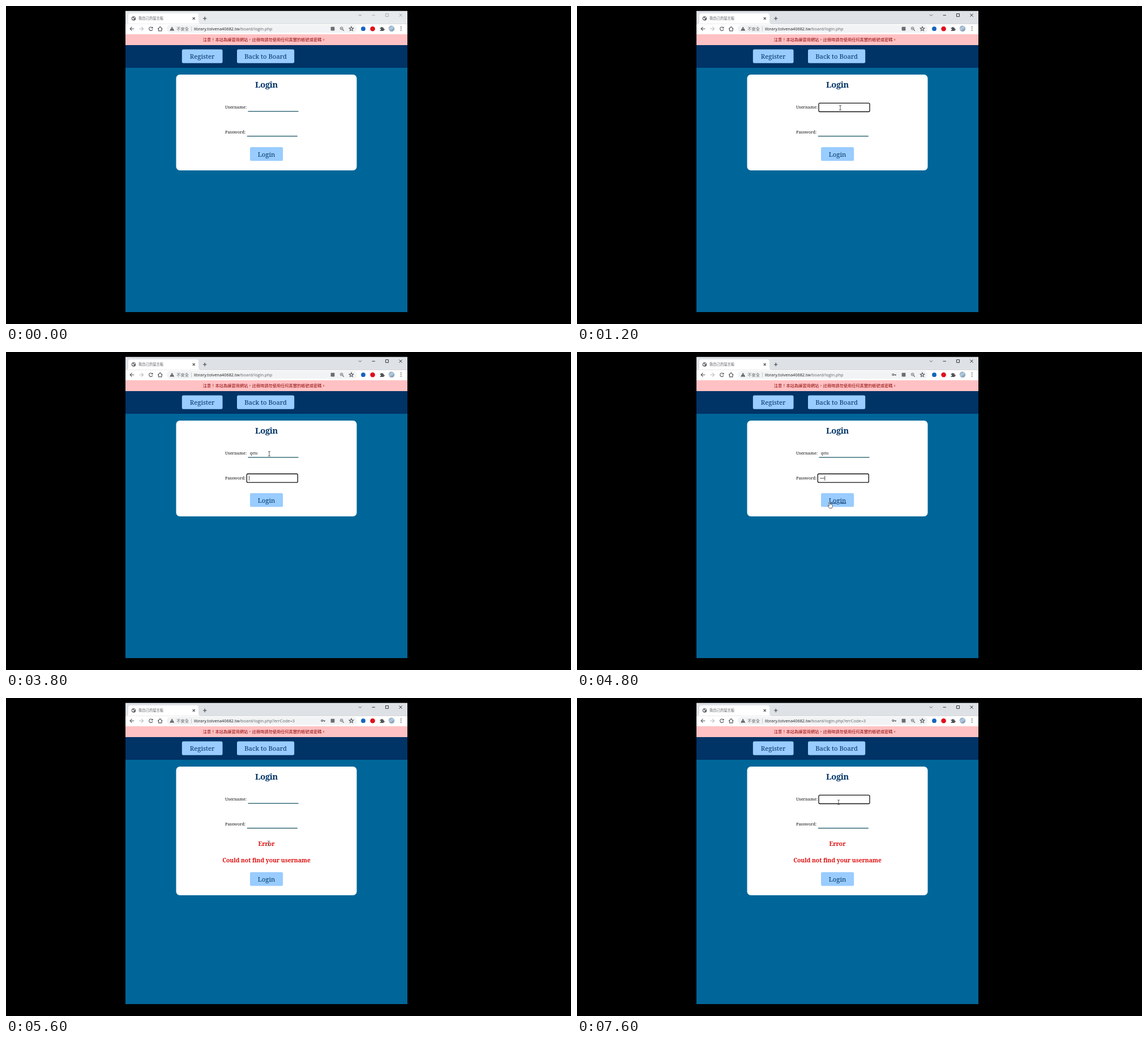
An HTML page for the animation above (8000 ms loop, 998x561 px).

```html
<!DOCTYPE html>
<html lang="zh-Hant">
<head>
<meta charset="utf-8">
<title>Login form</title>
<style>
html, body { margin: 0; width: 100%; height: 100%; overflow: hidden; background: #000; }
svg { display: block; width: 100vw; height: 100vh; }
text { white-space: pre; }
.slab { font-family: "Noto Serif", serif; font-weight: 500; }
.bold { font-weight: 700; }
.ui { font-family: "Open Sans", "Noto Sans CJK TC", "Noto Sans CJK JP", "Noto Sans CJK", sans-serif; }
.mid { text-anchor: middle; }
.line { fill: none; stroke: #505458; stroke-width: 1.1; }
.thin { stroke-width: .8; }
</style>
</head>
<body>
<svg id="stage" viewBox="0 0 998 561"></svg>
<script>
const STEPS_PER_SECOND = 15, LOOP = 8000;
const DOMAIN = "library.tolvena40682.tw", USER = "qeto";

const rect = (x, y, w, h, fill, r = 0, more = "") =>
  `<rect x="${x}" y="${y}" width="${w}" height="${h}" rx="${r}" fill="${fill}" ${more}/>`;
const text = (x, y, size, fill, cls, str, more = "") =>
  `<text x="${x}" y="${y}" font-size="${size}" fill="${fill}" class="${cls}" ${more}>${str}</text>`;
const line = (d, more = "") => `<path class="line" d="${d}" ${more}/>`;
const disc = (x, y, r, fill) => `<circle cx="${x}" cy="${y}" r="${r}" fill="${fill}"/>`;
const group = (id, body, more = "") => `<g id="${id}" ${more}>${body}</g>`;
const cross = (x, y, r) => `M${x - r} ${y - r}l${2 * r} ${2 * r}m0 ${-2 * r}l${-2 * r} ${2 * r}`;
const button = (x, y, w, label, id = "") =>
  rect(x, y, w, 24.3, "#9cf", 2.5) +
  text(x + w / 2, y + 16.5, 11.3, "#036", "slab mid", label, id && `id="${id}"`);
const field = (id, x, y) =>
  rect(x + .5, y + 14, 89, 1.2, "#0a4a5a", 0, `id="${id}Line"`) +
  rect(x, y, 90, 15.2, "#fff", 2, `id="${id}Ring" stroke="#101010" stroke-width="1.3"`);

function star(x, y, r) {
  const points = [...Array(10)].map((_, i) => {
    const a = i * Math.PI / 5 - Math.PI / 2, d = i % 2 ? r * .45 : r;
    return `${(x + d * Math.cos(a)).toFixed(2)} ${(y + d * Math.sin(a)).toFixed(2)}`;
  });
  return line(`M${points.join("L")}Z`, 'stroke-width=".8"');
}

const tabStrip =
  rect(211, 8.7, 498, 23, "#dee1e6", 0, 'id="strip"') +
  '<path d="M212 31.5Q216 31.5 216 27.5V17Q216 13 220 13H336Q340 13 340 17V27.5Q340 31.5 344 31.5Z" fill="#fff"/>' +
  group("globe", disc(225.5, 22, 3.8, "#5f6368") +
    '<path d="M222.7 20.5L225 20.8 225.8 22.2 224.8 24.8 223.5 23.5ZM226.3 18.9L228.3 20.4 227.4 21.7 226 20.7Z" fill="#fff"/>') +
  line("M225.5 18.3A3.7 3.7 0 0 0 221.8 22", 'id="spinner" style="stroke:#c4c7cb"') +
  group("tabTitle", text(234, 24.4, 6.3, "#5f6368", "ui", "我自己的留言板")) +
  group("tabUrl", text(234, 24.3, 6.2, "#4a4d51", "ui", DOMAIN + "/board/login") +
    rect(314, 15, 10, 14, "url(#fade)") + rect(323.8, 15, 5, 14, "#fff"), 'clip-path="url(#tabClip)"') +
  line(cross(331.7, 22, 2)) +
  line("M348 22h6.4M351.2 18.8v6.4", 'style="stroke:#3c4043"') +
  group("controls", line("M622.8 15l2.6 2.6 2.6-2.6", 'style="stroke-width:.9"') +
    `<path d="M646.5 16.3h5.4M670.5 13.6h5v5h-5zM${"694.4 13.6l5.2 5.2m0-5.2l-5.2 5.2"}" fill="none" stroke="currentColor" stroke-width=".9"/>`);

const toolbar =
  rect(211, 31.4, 498, 18.6, "#fff") +
  line("M226.3 40.2H219.3M222.5 36.8L219.1 40.2 222.5 43.6") +
  line("M235.3 40.2H242.3M239.1 36.8L242.5 40.2 239.1 43.6", 'style="stroke:#b8bbbf"') +
  group("reload", line("M258.4 38.2A3.2 3.2 0 1 0 258.9 41.2") +
    '<path d="M259.5 36.4v3.2h-3.2z" fill="#505458"/>') +
  line(cross(255.7, 40.2, 2.8), 'id="stop"') +
  line("M268.1 40.6L272.2 36.6 276.3 40.6M269.5 39.6V43.9H275V39.6") +
  rect(284, 33.2, 335.5, 14, "#f1f3f4", 7) +
  '<path d="M293.2 36.5L297.2 43.6H289.2Z" fill="#505458"/><path d="M293.2 39v2.2m0 .7v.8" stroke="#fff" stroke-width=".8"/>' +
  text(301.3, 42.8, 7.2, "#5f6368", "ui", "不安全") +
  rect(327, 36, .7, 8.5, "#b5b8bc") +
  text(332, 42.7, 7.38, "#202124", "ui",
    `${DOMAIN}<tspan fill="#5f6368">/board/login.php<tspan id="query">?errCode=3</tspan></tspan>`) +
  group("key", '<circle cx="558.3" cy="40" r="1.5" class="line"/>' + line("M559.8 40H564M562.7 40v2")) +
  rect(573.6, 36.8, 6.8, 6.8, "#6b6f74", 1, 'id="translate"') +
  '<circle cx="592.7" cy="39.5" r="2.4" class="line thin"/>' +
  line("M594.5 41.3l2.4 2.4M591.5 39.5h2.4", 'stroke-width=".9"') +
  star(610, 40.3, 3.9) +
  disc(631, 40.2, 3.9, "#1565c0") +
  disc(647.6, 40.2, 4.3, "#e0101c") +
  '<path d="M660.6 38.2h2.2a1.2 1.2 0 1 1 2.3 0h2v2.2a1.2 1.2 0 1 1 0 2.2v1.4h-6.5v-1.6a1.2 1.2 0 1 0 0-2.3z" fill="#505458"/>' +
  disc(681, 39.7, 5.3, "url(#sky)") +
  [36.9, 40, 43.1].map(y => disc(697.7, y, .85, "#505458")).join("");

const page =
  rect(211, 50, 498, 490, "#069") +
  rect(211, 49.8, 498, 19.4, "#ffc1c3") +
  text(347.7, 62.4, 7.24, "#8b0000", "ui", "注意！本站為練習用網站，註冊時請勿使用任何真實的帳號或密碼。") +
  rect(211, 69, 498, 40, "#036") +
  button(310.8, 76.4, 71.7, "Register") +
  button(408, 76.4, 101.2, "Back to Board") +
  rect(300.5, 121, 319, 169, "#fff", 6.5, 'id="card"') +
  text(460, 143.6, 14.6, "#036", "slab bold mid", "Login", 'letter-spacing="-.35"') +
  text(387, 181.2, 7.4, "#111", "slab", "Username:") +
  text(387, 225, 7.4, "#111", "slab", "Password:") +
  field("user", 427, 171.3) + field("pass", 425.3, 215) +
  text(430.8, 181.3, 6.7, "#222", "slab", "", 'id="typed"') +
  group("dots", [0, 1, 2, 3].map(i => disc(430 + i * 2.1, 222.8, .8, "#222")).join("")) +
  rect(0, 0, .8, 8.6, "#222", 0, 'id="caret"') +
  group("error", text(460, 261.2, 10.4, "#e01010", "slab bold mid", "Error", 'letter-spacing="-.1"') +
    text(460, 290.2, 10.4, "#e01010", "slab bold mid", "Could not find your username", 'letter-spacing="-.08"')) +
  group("submit", button(431, 249, 58.2, "Login", "submitText"));

const pointers =
  group("beam", line("M-2 -4.2Q0 -4.2 0 -3Q0 -4.2 2 -4.2M0 -3.2V3.2M-2 4.2Q0 4.2 0 3Q0 4.2 2 4.2", 'style="stroke:#444;stroke-width:.9"')) +
  group("arrow", '<path d="M0 0V9.5L2.2 7.4 3.8 11 5.2 10.3 3.7 6.9H6.8Z" fill="#fff" stroke="#222" stroke-width=".7"/>') +
  group("hand", '<path d="M-.9 .8Q0 -.7 .9 .8V4.4Q1.8 3.5 2.5 4.7Q3.4 4.1 3.9 5.2Q5 4.8 5 6.2V8.4L4 11.3H-.4L-3.2 7.4Q-3 5.9 -1.7 7L-.9 7.7Z" fill="#fff" stroke="#222" stroke-width=".7"/>');

document.getElementById("stage").innerHTML =
  `<defs>
    <linearGradient id="fade"><stop stop-color="#fff" stop-opacity="0"/><stop offset="1" stop-color="#fff"/></linearGradient>
    <linearGradient id="sky" x2=".6" y2="1"><stop stop-color="#6f93b8"/><stop offset=".5" stop-color="#b9cddd"/><stop offset="1" stop-color="#7d98b3"/></linearGradient>
    <clipPath id="tabClip"><rect x="230" y="14" width="95" height="16"/></clipPath>
  </defs>` + rect(0, 0, 998, 561, "#000") + tabStrip + toolbar + page + group("pointer", pointers);

const el = {};
document.querySelectorAll("[id]").forEach(node => el[node.id] = node);
const show = (id, on) => el[id].setAttribute("visibility", on ? "inherit" : "hidden");
const set = (id, attrs) => { for (const name in attrs) el[id].setAttribute(name, attrs[name]); };
const between = (v, a, b) => v >= a && v < b;
const inside = (p, x, y, w, h) => between(p.x, x, x + w) && between(p.y, y, y + h);
const passed = (times, k) => times.filter(time => k >= time).length;

// Pointer stops: step, x, y
const path = [
  [1, 480, 360], [9, 465, 179.5], [62, 465, 179.5], [68, 451, 276], [72, 446.2, 264.3],
  [77, 447, 264], [83, 461, 258], [84, 464, 256.5], [89, 464, 256.5], [93, 454, 263], [102, 462, 184]
];

function pointerAt(k) {
  const next = path.findIndex(stop => stop[0] > k);
  if (next < 0) return { x: 462, y: 184 };
  if (next === 0) return { x: 480, y: 360 };
  const [k0, x0, y0] = path[next - 1], [k1, x1, y1] = path[next];
  const u = (k - k0) / (k1 - k0), e = u * u * (3 - 2 * u);
  return { x: x0 + (x1 - x0) * e, y: y0 + (y1 - y0) * e };
}

function draw(ms) {
  const k = Math.floor(ms % LOOP * STEPS_PER_SECOND / 1000 + .06);
  const active = k >= 10, failed = k >= 84;
  const waiting = between(k, 79, 84), committed = between(k, 82, 84);
  const userFocus = between(k, 10, 57) || k >= 106;
  const passFocus = between(k, 57, 78);

  set("strip", { fill: active ? "#dee1e6" : "#e7eaed" });
  set("controls", { color: active ? "#222" : "#8a8d91", opacity: active ? 1 : .75 });
  show("globe", !waiting);
  show("spinner", waiting);
  set("spinner", { transform: `rotate(${(k - 83) * 30} 225.5 22)` });
  show("tabTitle", !committed);
  show("tabUrl", committed);
  show("reload", !waiting);
  show("stop", waiting);
  el.query.textContent = k >= 82 ? "?errCode=3" : "";
  show("key", k >= 61);
  set("key", { transform: `translate(${committed ? 16.5 : 0})` });
  show("translate", !committed);

  const letters = failed ? 0 : passed([42, 46, 49, 53], k);
  const dots = failed ? 0 : passed([60, 62, 64, 66], k);
  el.typed.textContent = USER.slice(0, letters);
  [...el.dots.children].forEach((dot, i) => dot.setAttribute("visibility", i < dots ? "inherit" : "hidden"));
  show("userRing", userFocus);
  show("userLine", !userFocus);
  show("passRing", passFocus);
  show("passLine", !passFocus);

  const blinkOff = between(k, 18, 27) || between(k, 34, 42) || between(k, 74, 78) || k >= 114;
  show("caret", (userFocus || passFocus) && !blinkOff);
  const typedWidth = letters ? el.typed.getComputedTextLength() : 0;
  set("caret", userFocus
    ? { x: 430.3 + typedWidth, y: 174.3 }
    : { x: 429 + dots * 2.1, y: 218.2 });

  set("card", { height: failed ? 227 : 169 });
  show("error", failed);
  set("submit", { transform: `translate(0 ${failed ? 58.2 : 0})` });

  const p = pointerAt(k);
  const onButton = !failed && inside(p, 431, 249, 58.2, 24.3);
  const onText = inside(p, 427, 171, 90, 16) || inside(p, 425, 215, 90, 15) ||
    failed && inside(p, 446, 248, 28, 15);
  const kind = onText || k === 83 ? "beam" : onButton ? "hand" : "arrow";
  show("pointer", k >= 1);
  set("pointer", { transform: `translate(${p.x} ${p.y})` });
  ["beam", "hand", "arrow"].forEach(id => show(id, id === kind));
  set("submitText", { "text-decoration": onButton && k >= 1 ? "underline" : "none" });
}

const start = performance.now();
function tick() {
  draw(performance.now() - start);
  requestAnimationFrame(tick);
}
tick();
</script>
</body>
</html>
```
